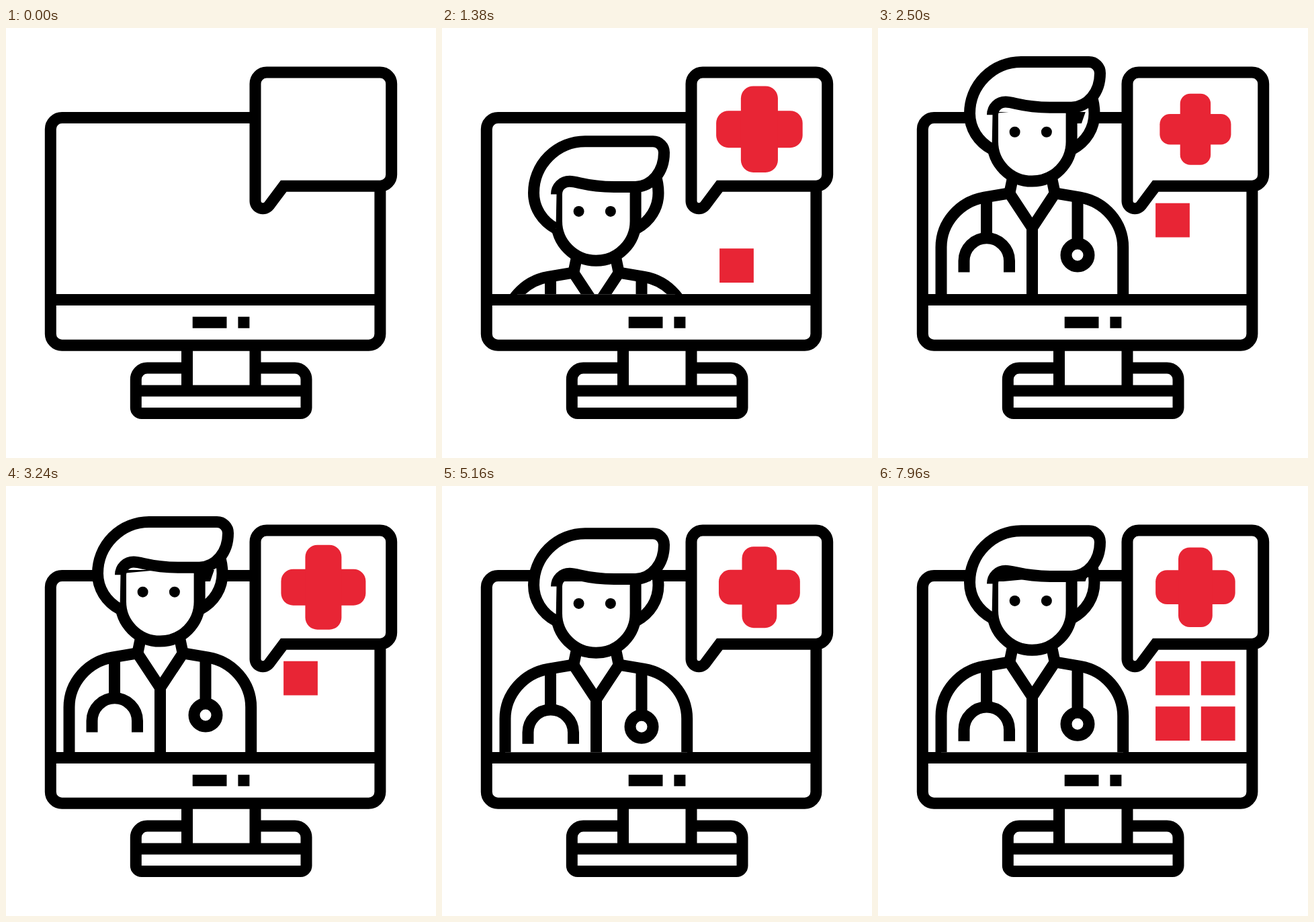
An HTML page that plays this animation: 640x640 px, repeating every 8 s.

```html
<!DOCTYPE html>
<html lang="en">
<head>
<meta charset="utf-8">
<title>Online doctor</title>
<style>
  html, body { margin: 0; width: 100%; height: 100%; overflow: hidden; background: #fff; }
  svg { display: block; width: 100%; height: 100%; }
  .line { fill: none; stroke: #000; stroke-width: 17; }
  .solid { fill: #fff; }
  .red { fill: #e82535; }
</style>
</head>
<body>
<svg viewBox="0 0 640 640">
  <clipPath id="screen"><rect width="640" height="396.3"/></clipPath>

  <g class="line">
    <path d="M269.5 506H210.3a17 17 0 0 0-17 17V565a8.5 8.5 0 0 0 8.5 8.5H438.5a8.5 8.5 0 0 0 8.5-8.5V523a17 17 0 0 0-17-17H371"/>
    <path d="M193 540H447M269.5 472V540M371 472V540"/>
    <rect x="66.3" y="133.6" width="490.6" height="338.6" rx="17"/>
    <path d="M66 404.5H557"/>
  </g>
  <path d="M277.7 429.8h50.8v17h-50.8zM345.4 429.8h17v17h-17z"/>

  <g id="squares" class="red">
    <rect x="480.8" y="328.2" width="50.8" height="50.8"/>
    <rect x="413.1" y="328.2" width="50.8" height="50.8"/>
    <rect x="413.1" y="260.7" width="50.8" height="50.8"/>
    <rect x="480.8" y="260.7" width="50.8" height="50.8"/>
  </g>

  <g clip-path="url(#screen)">
    <g id="doctor" class="line">
      <!-- body -->
      <path class="solid" stroke="none" d="M94 404V343C94 306 122 275 158 268.8L196 262.5 200 240H260L263 262.5 301 268.8C337 275 365 306 365 343V404z"/>
      <path d="M94 800V343C94 306 122 275 158 268.8L195.5 262.5 229.5 314 263.5 262.5 301 268.8C337 275 364.7 306 364.7 343V800"/>
      <path d="M229.5 311V800M200.5 240L195.7 263M258.5 240L263.3 263"/>
      <!-- stethoscope -->
      <path d="M161.5 268V331M128 380.2V363.3a33.75 33.75 0 0 1 67.5 0V380.2M297 268V338"/>
      <circle class="solid" cx="297" cy="354.7" r="17"/>
      <!-- head -->
      <path class="solid" d="M317.5 117Q322 130 322 144C322 166 310 186 289.5 197"/>
      <path class="solid" d="M170.5 144V186a58.8 58.8 0 0 0 117.6 0V133"/>
      <path class="solid" d="M169.5 197C149 186 136.5 166 136.5 144A76.7 76.7 0 0 1 213 67.2H314A16.5 16.5 0 0 1 330.5 84C330.5 112 313 134 288 135H258C215 135 203 126.8 190 126.8 179 126.8 170.5 135 170.5 146"/>
      <g fill="#000" stroke="none">
        <circle cx="203.6" cy="171.4" r="8"/>
        <circle cx="250.9" cy="171.4" r="8"/>
      </g>
    </g>
  </g>

  <path class="line solid" d="M371 83a17 17 0 0 1 17-17H556.7a17 17 0 0 1 17 17V218.3a17 17 0 0 1-17 17H413.2L391.3 264.5A11.4 11.4 0 0 1 371 257.7z"/>
  <g id="cross" class="red">
    <rect x="-59.3" y="-25.4" width="118.6" height="50.8" rx="17"/>
    <rect x="-25.4" y="-59.3" width="50.8" height="118.6" rx="17"/>
  </g>
</svg>
<script>
  const LOOP = 8000, START = 0.3;
  const BEAT = 560, STARTS = [0, 120, 260, 300, 440];
  const SLOT = 10.7, FADE = 49;

  const doctor = document.getElementById('doctor');
  const cross = document.getElementById('cross');
  const squares = [...document.getElementById('squares').children];
  const clamp = v => Math.max(0, Math.min(1, v));

  // Uneven holds: five poses in every beat.
  function poseAt(ms) {
    const rest = ms % BEAT;
    return Math.floor(ms / BEAT) * 5 + STARTS.filter(s => s <= rest).length - 1;
  }

  // Straight run from 0 to 1, then a damped swing around 1.
  function spring(n, end, amp, decay, period) {
    if (n < end) return clamp((n - START) / (end - START));
    const m = n - end;
    return 1 + amp * Math.exp(-decay * m) * Math.sin(2 * Math.PI * m / period);
  }

  function squareAlpha(i, n) {
    if (n >= FADE) return clamp((n - FADE) / 10.6);
    return n > START && Math.floor((n - START) / SLOT) === i ? 1 : 0;
  }

  function draw(ms) {
    const n = poseAt(ms);
    const rise = 339 * (1 - spring(n, 17, 0.106, 0.078, 41.6));
    const scale = spring(n, 11, 0.223, 0.067, 15.1);
    doctor.setAttribute('transform', `translate(0 ${rise.toFixed(3)})`);
    cross.setAttribute('transform', `translate(472.4 150.7) scale(${scale.toFixed(4)})`);
    squares.forEach((s, i) => s.setAttribute('opacity', squareAlpha(i, n)));
  }

  const begin = performance.now();
  function tick() {
    draw((performance.now() - begin) % LOOP);
    requestAnimationFrame(tick);
  }
  tick();
</script>
</body>
</html>
```
